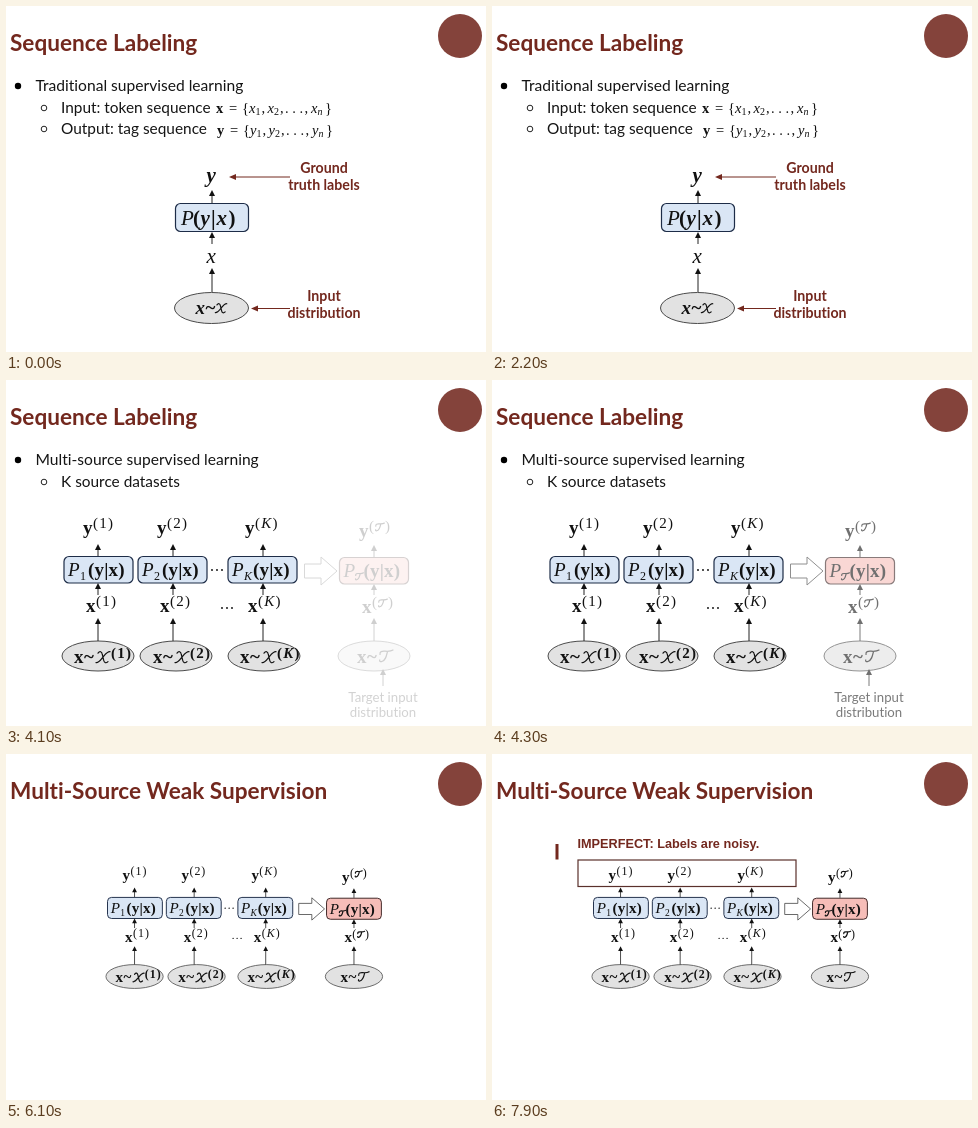
These frames come from a looping animation (480x346 px, 8000 ms). An HTML page:

```html
<!DOCTYPE html>
<html lang="en">
<head>
<meta charset="utf-8">
<title>Sequence Labeling</title>
<style>
  html, body { margin: 0; width: 100%; height: 100%; overflow: hidden; background: #fff; }
  svg { display: block; width: 100vw; height: 100vh; }
  text { font-family: Lato, sans-serif; font-variant-ligatures: none; fill: #151515; white-space: pre; }
  .title { font-size: 22.6px; font-weight: 700; fill: #73281e; }
  .body { font-size: 15.6px; }
  .item { font-size: 15.4px; }
  .label { font-size: 14.2px; font-weight: 700; fill: #73281e; text-anchor: middle; }
  .small { font-size: 13.2px; fill: #222; text-anchor: middle; }
  .note { font: 700 12.7px "Liberation Sans", Arial, sans-serif; fill: #73281e; }
  .m { font-family: "Liberation Serif", "Times New Roman", serif; fill: #111; }
  .b { font-weight: 700; }
  .i { font-style: italic; }
  .eq { font-size: 14.5px; }
  .var { font-size: 19px; }
  .big { font-size: 21px; }
  .sup { font-size: 15px; letter-spacing: 1.3px; }
  .sub { font-size: 12px; }
  .arg { font-size: 19px; letter-spacing: .2px; }
  .ln { fill: none; stroke: #222; stroke-width: 1; }
  .red { stroke: #73281e; }
  .frame { stroke: #5a302b; stroke-width: 1.2; }
  .block { stroke: #444; }
  .box { fill: #dae6f5; stroke: #1d2c47; stroke-width: 1.2; }
  .pink { fill: #f6bdb8; stroke: #3a2222; }
  .oval { fill: #e2e2e2; stroke: #4a4a4a; stroke-width: 1; }
  .pen { fill: none; stroke: #111; stroke-width: 1.2; stroke-linecap: round; vector-effect: non-scaling-stroke; }

  .s1, .s2, .s3, .s12 { animation: 8s step-end infinite; }
  .s1 { animation-name: first; }
  .s2 { animation-name: second; }
  .s3 { animation-name: third; }
  .s12 { animation-name: both; }
  .target { animation: target 8s linear infinite; }
  .notes { animation: notes 8s linear infinite; }
  @keyframes first { 0% { opacity: 1 } 28.75%, 100% { opacity: 0 } }
  @keyframes second { 0% { opacity: 0 } 28.75% { opacity: 1 } 75%, 100% { opacity: 0 } }
  @keyframes both { 0% { opacity: 1 } 75%, 100% { opacity: 0 } }
  @keyframes third { 0% { opacity: 0 } 75%, 100% { opacity: 1 } }
  @keyframes target {
    0% { opacity: 0 }
    51.25% { opacity: 0; animation-timing-function: steps(5, start) }
    57.5%, 100% { opacity: 1 }
  }
  @keyframes notes {
    0% { opacity: 0 }
    93.75% { opacity: 0; animation-timing-function: steps(5, start) }
    100% { opacity: 1 }
  }
</style>
</head>
<body>
<svg id="stage" viewBox="0 0 480 346"></svg>
<script>
const text = (x, y, cls, s) => `<text x="${x}" y="${y}" class="${cls}">${s}</text>`;
const math = (x, y, cls, s) => text(x, y, 'm ' + cls, s);
const oval = (cx, cy, rx, ry) => `<ellipse cx="${cx}" cy="${cy}" rx="${rx}" ry="${ry}" class="oval"/>`;
const box = (x, y, w, h, cls = '') => `<rect x="${x}" y="${y}" width="${w}" height="${h}" rx="5" class="box ${cls}"/>`;
const dots = (x, y) => [0, 5, 10].map(d => `<circle cx="${x + d}" cy="${y}" r=".9"/>`).join('');

// Upward black arrow and leftward red arrow
const up = (x, from, to) =>
  `<path class="ln" d="M${x} ${from}V${to + 4}"/><path d="M${x} ${to}l3 6h-6z" fill="#111"/>`;
const left = (y, from, to) =>
  `<path class="ln red" d="M${from} ${y}H${to + 4}"/><path d="M${to} ${y}l7 -3v6z" fill="#73281e"/>`;

// Calligraphic capitals, 16 wide, standing on the baseline
const glyphs = {
  X: 'M3 -9.8C4.8 -12.4 6.8 -11.5 7.3 -8.5L8.6 -3C9.2 0 11 .6 13 -1.4M15 -11.3C12.5 -11.6 11 -9.5 8 -6C5.5 -2.8 4 0 1 -.4',
  T: 'M2 -7.5C1.5 -10.5 4 -11 7 -10.8C10 -10.6 13 -10.5 15 -12M9.5 -10.5C8.5 -6 7.5 -1 3.5 -.4C2 0 1.3 -1 1.8 -2'
};
const script = (x, y, k, size = 1) =>
  `<path class="pen" transform="translate(${x} ${y}) scale(${size})" d="${glyphs[k]}"/>`;

const power = (x, y, k, cls = '') => k === 'T'
  ? math(x, y, 'sup', '(') + script(x + 5.5, y, 'T', .66) + math(x + 16, y, 'sup', ')')
  : math(x, y, 'sup ' + cls, k === 'K' ? '(<tspan class="i">K</tspan>)' : `(${k})`);

// One model column: labels, conditional, input, distribution
function column(k, c, oc, bx, yx, tx) {
  const t = k === 'T', d = t ? 1 : 0, px = bx + 4;
  const ax = px + (k === 'K' ? 21 : 20);
  const sub = t ? script(px + 11, 200, 'T', .6)
    : math(px + 12, 199.5, 'sub' + (k === 'K' ? ' i' : ''), k);
  return oval(oc, 276, 36, 15) + box(bx, 176.5 + d, 69, 26.5, t ? 'pink' : '')
    + up(c, 261, 238) + up(c, 215, 203 + d) + up(c, 176 + d, 164 + d)
    + math(yx, 154 + 3 * d, 'var b', 'y') + power(yx + 10, 148 + 3 * d, k)
    + math(px, 196 + d, 'var i', 'P') + sub + math(ax, 196 + d, 'arg b', '(y|x)')
    + math(yx + 3, 232 + d, 'var b', 'x') + power(yx + 13, 226 + d, k)
    + math(tx, 283, 'var b', 'x') + math(tx + 10, 283, 'var b', '~')
    + (t ? script(tx + 21, 282, 'T') : script(tx + 21, 283, 'X') + power(tx + 37, 278, k, 'b'));
}

const sources = column('1', 92, 92, 58, 77, 68) + column('2', 167, 170, 132, 151, 147)
  + column('K', 257, 258, 222, 239, 234) + dots(206, 190) + dots(216, 228);
const target = '<path class="ln block" d="M298.5 184H315V177L331 191L315 205V198H298.5Z"/>'
  + column('T', 368, 368, 333.5, 353, 351);

// v = {v1, v2, ..., vn}
function vector(v, x, y) {
  const item = (dx, n) => math(x + dx, y, 'eq',
    `<tspan class="i">${v}</tspan><tspan font-size="10" dy="2">${n}</tspan>`);
  return math(x, y, 'eq b', v) + math(x + 13, y, 'eq', '=') + math(x + 26, y, 'eq', '{')
    + item(33, '1') + math(x + 45.5, y, 'eq', ',') + item(51.5, '2') + math(x + 64, y, 'eq', ',')
    + math(x + 69, y, 'eq', '. . .') + math(x + 88.5, y, 'eq', ',')
    + item(95, '<tspan class="i">n</tspan>') + math(x + 109, y, 'eq', '}');
}

const bullet = '<circle cx="12" cy="80" r="3.2"/>';
const ring = y => `<circle cx="38" cy="${y}" r="2.8" class="ln"/>`;

const slide1 = text(29.5, 85, 'body', 'Traditional supervised learning')
  + ring(123) + text(55, 106.5, 'item', 'Input: token sequence')
  + text(55, 127.5, 'item', 'Output: tag sequence')
  + vector('x', 210, 107) + vector('y', 211, 129)
  + math(200.5, 176, 'big b i', 'y') + up(206, 197, 184)
  + box(169.5, 197.5, 73, 28) + math(175, 219, 'big i', 'P')
  + math(187, 219, 'big b', '(') + math(194.5, 219, 'big b i', 'y') + math(205, 219, 'big b', '|')
  + math(210.5, 219, 'big b i', 'x') + math(222.5, 219, 'big b', ')')
  + up(206, 238, 226) + math(200.5, 257, 'big i', 'x') + up(206, 286, 262)
  + oval(205.5, 302, 37, 15.5) + math(189.5, 308, 'var b i', 'x') + math(199.5, 308, 'var b', '~')
  + script(208.5, 307, 'X', .82)
  + left(171, 284, 223) + left(302.5, 284, 245)
  + text(318, 167, 'label', 'Ground') + text(318, 184, 'label', 'truth labels')
  + text(318, 295, 'label', 'Input') + text(318, 312, 'label', 'distribution');

const slide2 = text(29.5, 85, 'body', 'Multi-source supervised learning')
  + text(55, 106.5, 'item', 'K source datasets') + sources
  + `<g class="target">${target}${up(377, 306, 289)}`
  + text(377, 322, 'small', 'Target input') + text(377, 337, 'small', 'distribution') + '</g>';

const slide3 = text(4, 45, 'title', 'Multi-Source Weak Supervision')
  + `<g transform="translate(55.4 3.1) scale(.795)">${sources}${target}</g>`
  + '<g class="notes"><rect x="86" y="106" width="218" height="26.5" class="ln frame"/>'
  + '<rect x="63.5" y="90" width="3" height="15.5" fill="#73281e"/>'
  + text(85.5, 94, 'note', 'IMPERFECT: Labels are noisy.') + '</g>';

document.getElementById('stage').innerHTML =
  '<rect width="480" height="346" fill="#fff"/><circle cx="454" cy="30" r="22" fill="#84433b"/>'
  + `<g class="s12">${text(4, 45, 'title', 'Sequence Labeling')}${bullet}${ring(102)}</g>`
  + `<g class="s1">${slide1}</g><g class="s2">${slide2}</g><g class="s3">${slide3}</g>`;
</script>
</body>
</html>
```
